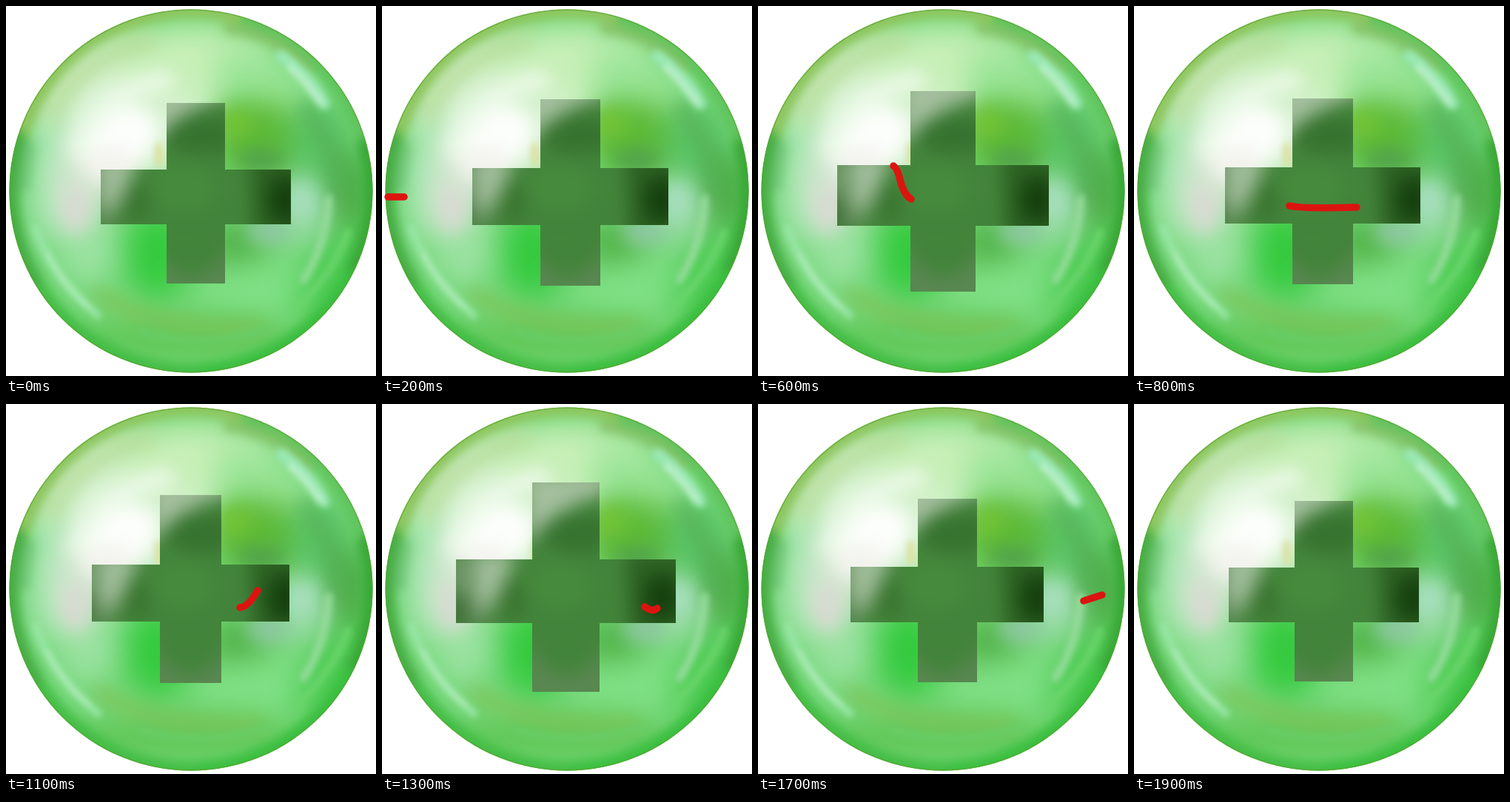
These frames come from a looping animation (500 px wide and 500 px high, 2000 ms). An HTML page:

```html
<!DOCTYPE html>
<html lang="en">
<head>
<meta charset="utf-8">
<title>Green cross orb</title>
<style>
  html, body { margin: 0; width: 100%; height: 100%; overflow: hidden; background: #fff; }
  svg { display: block; width: 100%; height: 100%; }
  .b20 { filter: blur(20px); }
  .b12 { filter: blur(12px); }
  .b7 { filter: blur(7px); }
  .b4 { filter: blur(4px); }
  .line { fill: none; stroke-linecap: round; }
</style>
</head>
<body>
<svg viewBox="0 0 500 500">
  <defs>
    <clipPath id="ball"><circle cx="250" cy="250" r="245.5"/></clipPath>
    <clipPath id="plus"><path id="cross"/></clipPath>
  </defs>

  <g clip-path="url(#ball)">
    <rect width="500" height="500" fill="#76d87a"/>

    <!-- broad tints -->
    <g class="b20">
      <ellipse cx="155" cy="140" rx="125" ry="105" fill="#d8f2d3"/>
      <ellipse cx="255" cy="75" rx="115" ry="48" fill="#c8efb8"/>
      <ellipse cx="60" cy="230" rx="28" ry="90" fill="#a4e6b0"/>
      <ellipse cx="100" cy="250" rx="42" ry="78" fill="#d2e6d0"/>
      <ellipse cx="350" cy="105" rx="75" ry="34" fill="#98e496" transform="rotate(25 350 105)"/>
      <ellipse cx="340" cy="178" rx="65" ry="50" fill="#5cb936"/>
      <ellipse cx="425" cy="190" rx="45" ry="60" fill="#5ac466"/>
      <ellipse cx="464" cy="255" rx="24" ry="60" fill="#42a338"/>
      <ellipse cx="400" cy="275" rx="42" ry="46" fill="#9cdcaa"/>
      <ellipse cx="205" cy="335" rx="45" ry="60" fill="#34ca3e"/>
      <ellipse cx="312" cy="325" rx="38" ry="34" fill="#4fb045"/>
      <ellipse cx="345" cy="378" rx="90" ry="34" fill="#7fe085"/>
      <ellipse cx="440" cy="360" rx="34" ry="70" fill="#4bca50" transform="rotate(30 440 360)"/>
      <ellipse cx="112" cy="330" rx="40" ry="48" fill="#9be2a2"/>
      <ellipse cx="240" cy="450" rx="160" ry="24" fill="#5ec552"/>
    </g>

    <!-- smaller patches -->
    <g class="b12">
      <ellipse cx="158" cy="180" rx="52" ry="38" fill="#fcfefb" transform="rotate(-35 158 180)"/>
      <ellipse cx="140" cy="215" rx="40" ry="24" fill="#f3f3ee"/>
      <path class="line" d="M95 195Q120 120 215 100" stroke="#ebf9e8" stroke-width="26"/>
      <ellipse cx="95" cy="275" rx="18" ry="34" fill="#d9d9d3"/>
      <ellipse cx="310" cy="158" rx="22" ry="20" fill="#72c334"/>
      <ellipse cx="345" cy="208" rx="34" ry="14" fill="#4f9f4c"/>
      <ellipse cx="355" cy="305" rx="30" ry="16" fill="#8fc6a4"/>
      <ellipse cx="400" cy="262" rx="16" ry="22" fill="#a9dfc2"/>
      <path class="line" d="M405 140Q445 185 452 255" stroke="#55b056" stroke-width="18"/>
      <path class="line" d="M125 390Q210 442 340 432" stroke="#7cc458" stroke-width="18"/>
      <path class="line" d="M60 150Q95 75 190 45" stroke="#b5dd9a" stroke-width="24"/>
    </g>

    <!-- rim shading -->
    <g class="b7 line" stroke-width="26">
      <path d="M18 175A244 244 0 0 1 330 16" stroke="#8dc55c"/>
      <path d="M330 16A244 244 0 0 1 486 185" stroke="#5fc45c"/>
      <path d="M488 190A246 246 0 0 1 464 370" stroke="#37a836"/>
      <path d="M464 370A246 246 0 0 1 250 496" stroke="#38be3e"/>
      <path d="M250 496A246 246 0 0 1 36 370" stroke="#43bd45"/>
      <path d="M36 370A246 246 0 0 1 14 180" stroke="#45ad42"/>
      <path d="M24 245Q26 215 32 190" stroke="#72c578" stroke-width="14"/>
      <path d="M300 30Q370 40 408 85" stroke="#86c268" stroke-width="14"/>
    </g>

    <!-- glossy streaks -->
    <g class="b4 line">
      <path d="M372 68Q405 90 430 132" stroke="#9ae8b4" stroke-width="16"/>
      <path d="M384 84Q404 100 424 130" stroke="#bcf0cc" stroke-width="9"/>
      <path d="M40 300Q62 366 124 418" stroke="#98e6a6" stroke-width="10"/>
      <path d="M56 335Q78 380 112 406" stroke="#b8efc0" stroke-width="5"/>
      <path d="M180 440Q260 466 350 437" stroke="#67cd67" stroke-width="9"/>
      <path d="M390 408Q438 370 462 305" stroke="#6bd56d" stroke-width="9"/>
      <path d="M436 260Q432 325 402 370" stroke="#96dc9c" stroke-width="10"/>
      <path d="M207 190V212" stroke="#dbe0a0" stroke-width="10"/>
    </g>

    <circle class="line" cx="250" cy="250" r="245" stroke="#5aa030" stroke-opacity=".6" stroke-width="2"/>
  </g>

  <g clip-path="url(#plus)">
    <rect width="500" height="500" fill="#43843b"/>
    <g class="b12">
      <ellipse cx="265" cy="175" rx="50" ry="26" fill="#377330"/>
      <path d="M190 90H320L300 122Q225 142 195 195Z" fill="#a3be9d"/>
      <path d="M85 200H170Q170 250 140 298H85Z" fill="#6c9565"/>
      <path d="M125 200H182Q170 235 150 268L128 275Z" fill="#a0bc9a"/>
      <ellipse cx="102" cy="280" rx="18" ry="26" fill="#42703a"/>
      <ellipse cx="178" cy="265" rx="16" ry="26" fill="#39742f"/>
      <ellipse cx="240" cy="245" rx="45" ry="36" fill="#468a3d"/>
      <path d="M330 200H430V320H335Z" fill="#2c6022"/>
      <ellipse cx="378" cy="262" rx="24" ry="32" fill="#15400e"/>
      <path d="M190 300Q212 365 250 367Q285 365 310 310V410H190Z" fill="#5a8752"/>
    </g>
  </g>

  <path id="pulse" class="line" stroke="#dc1410" stroke-width="9.5" stroke-linejoin="round"/>
</svg>

<script>
  const TICK = 100, LOOP = 2000;
  const cross = document.getElementById('cross');
  const pulse = document.getElementById('pulse');

  // tick, centre x, centre y, scale
  const beats = [
    [1, 256.5, 253, 1], [4, 250.5, 250, 1.1], [5, 250, 245, 1.222],
    [6, 250, 250.5, 1.112], [8, 255, 250.5, 1.028], [9, 255.5, 252, 1.01],
    [11, 249.5, 250, 1.039], [13, 248.5, 247.5, 1.157],
    [15, 254.5, 250, 1.047], [18, 256.5, 253, 1], [20, 256.5, 253, 1]
  ];

  // one stroke of the heartbeat per tick, starting at tick 2
  const strokes = [
    'M8 258H30', 'M30 258H53', 'M54 258Q105 259 159 257', 'M159 257Q174 250 183 216',
    'M183 216Q189 220 192 235Q197 255 207 261', 'M206 260L210 270', 'M210 270Q225 274 301 272',
    'M301 272L309 240', 'M309 240L316 275', 'M316 275Q327 275 340 252',
    'M340 252L355 274', 'M355 274Q366 282 372 276', 'M372 276L388 248',
    'M388 249Q402 281 417 282', 'M417 282L440 266', 'M440 266L465 258', 'M465 258H488'
  ];

  function poseAt(tick) {
    const i = beats.findIndex(b => b[0] > tick);
    const a = beats[i - 1], b = beats[i];
    const k = (tick - a[0]) / (b[0] - a[0]);
    return a.map((v, j) => v + (b[j] - v) * k).slice(1);
  }

  function crossPath(cx, cy, s) {
    const bar = (y, w, h) => {
      const [l, r, t, b] = [cx - w * s, cx + w * s, y - h * s, y + h * s].map(Math.round);
      return `M${l} ${t}H${r}V${b}H${l}z`;
    };
    return bar(cy, 39.5, 122) + bar(cy + 5.3, 128.5, 37);
  }

  function draw(now) {
    const tick = Math.max(1, Math.floor(now % LOOP / TICK));
    cross.setAttribute('d', crossPath(...poseAt(tick)));
    pulse.setAttribute('d', strokes[tick - 2] || '');
    requestAnimationFrame(() => draw(performance.now() - start));
  }

  const start = performance.now();
  draw(0);
</script>
</body>
</html>
```
